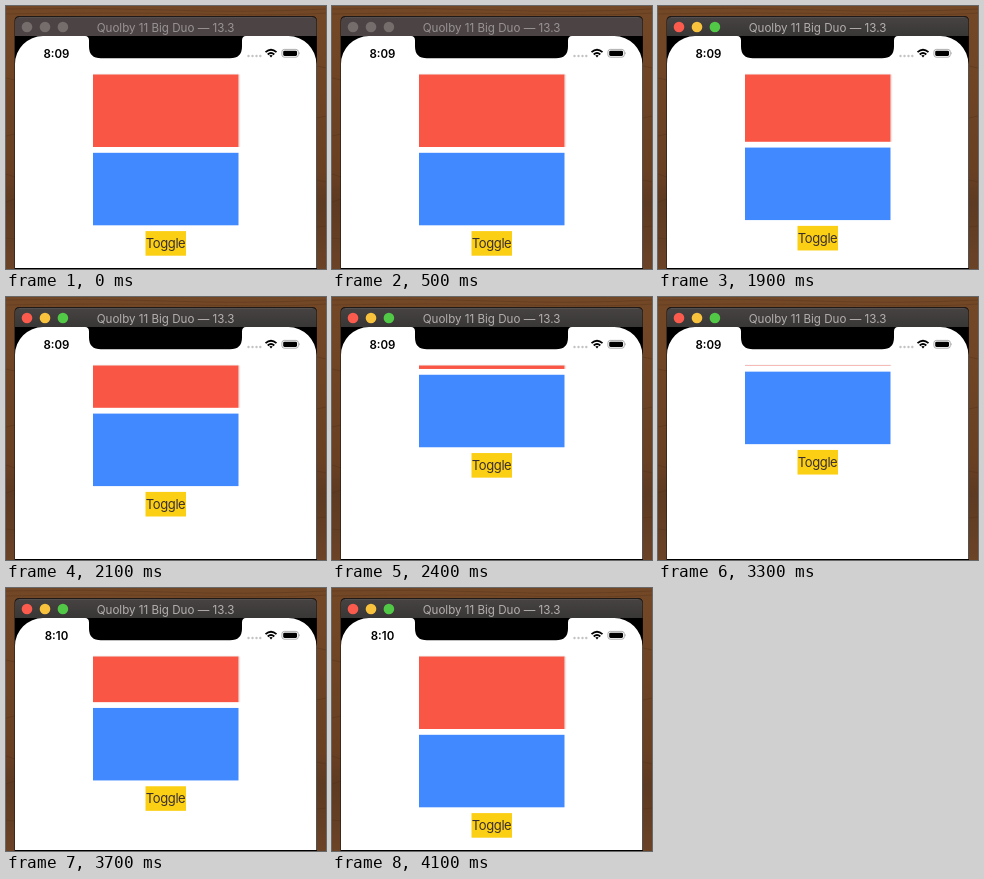
An HTML page that plays this animation: 320x263 px, repeating every 4.4 s.

```html
<!DOCTYPE html>
<html lang="en">
<head>
<meta charset="utf-8">
<title>Toggle animation</title>
<style>
  html, body { margin: 0; width: 100%; height: 100%; overflow: hidden; background: #6c4325; }
  svg { display: block; width: 100vw; height: 100vh; }
  text { font-family: Inter, "Liberation Sans", sans-serif; text-anchor: middle; }
  .bar { fill: #4b4344; }
  .title { font-size: 11.6px; fill: #999394; }
  .lights circle { fill: #756c6c; }
  .active .bar { fill: url(#barActive); }
  .active .title { fill: #b3afae; }
  .active .close { fill: #fb5b4d; }
  .active .minimize { fill: #f8c23c; }
  .active .zoom { fill: #52c946; }
  .clock { font-size: 11.5px; font-weight: 600; }
  .label { font-size: 13px; letter-spacing: -.4px; fill: #3a2f30; }
</style>
</head>
<body>
<svg id="stage" viewBox="0 0 320 263" preserveAspectRatio="none">
  <defs>
    <linearGradient id="wood" x2="0" y2="1">
      <stop offset="0" stop-color="#734827"/>
      <stop offset=".3" stop-color="#6e4425"/>
      <stop offset=".62" stop-color="#6a4023"/>
      <stop offset=".75" stop-color="#5d3a22"/>
      <stop offset="1" stop-color="#6b4327"/>
    </linearGradient>
    <linearGradient id="barActive" x2="0" y2="1">
      <stop offset="0" stop-color="#474343"/>
      <stop offset="1" stop-color="#393636"/>
    </linearGradient>
  </defs>

  <rect width="320" height="263" fill="url(#wood)"/>
  <g fill="none" stroke="#4f3019" stroke-opacity=".35">
    <path d="M0 3Q80 1 160 4T320 3M0 8Q100 6 190 8T320 7"/>
    <path d="M0 72l9 2M0 130l9-2M0 168l9 3M0 196l9-3M0 232l9 1M311 60l9 2M311 112l9-2M311 174l9 2M311 221l9-1"/>
  </g>

  <path d="M8.500 263V15Q8.500 10 13.500 10H306Q311 10 311 15V263Z" fill="#17110f"/>
  <path class="bar" d="M9 30V15.500Q9 11 13.500 11H306Q310.500 11 310.500 15.500V30Z"/>
  <path d="M13 11.300H306.500" stroke="#625d5d" stroke-width=".6"/>
  <g class="lights">
    <circle class="close" cx="21" cy="21" r="5.300"/>
    <circle class="minimize" cx="39" cy="21" r="5.300"/>
    <circle class="zoom" cx="56.900" cy="21" r="5.300"/>
  </g>
  <text class="title" x="159.500" y="25.500">Quolby 11 Big Duo — 13.3</text>

  <rect x="9" y="30" width="301.500" height="233" fill="#000"/>
  <path fill="#fff" d="M9 262V58A28 28 0 0 1 37 30H79Q83 30 83 34.500V40.500Q83 52.300 95 52.300H224Q236 52.300 236 40.500V34.500Q236 30 240 30H282.300A28 28 0 0 1 310.300 58V262Z"/>

  <text class="clock" id="clock" x="50.500" y="51.500">8:09</text>
  <g fill="#c3c3c5">
    <circle cx="242.500" cy="50" r="1.200"/><circle cx="246.500" cy="50" r="1.200"/>
    <circle cx="250.500" cy="50" r="1.200"/><circle cx="254.300" cy="50" r="1.200"/>
  </g>
  <g fill="none" stroke="#000" stroke-width="1.800">
    <path d="M259.500 46.200Q265 41.200 270.500 46.200M261.700 48.500Q265 45.600 268.300 48.500"/>
    <path d="M263.300 49.600Q265 48.400 266.700 49.600L265 51.400Z" fill="#000" stroke="none"/>
  </g>
  <rect x="275.900" y="43.400" width="16.400" height="7.800" rx="2.400" fill="none" stroke="#999" stroke-width=".8"/>
  <rect x="277.200" y="44.700" width="13.800" height="5.200" rx="1.300"/>
  <path d="M293.300 45.800Q294.700 47.300 293.300 48.800Z" fill="#999"/>

  <path d="M87 68.200H233" stroke="#ebe6e7" stroke-width=".8"/>
  <rect id="edge" x="232.500" y="68.500" width="1.700" fill="#ece5e4"/>
  <rect id="red" x="87" y="68.500" width="145.500" fill="#fa5645"/>
  <g id="below">
    <rect x="87" y="74.300" width="145.500" height="72.500" fill="#4189ff"/>
    <rect x="139.500" y="152.600" width="40.500" height="24.600" fill="#fbcf14"/>
    <text class="label" x="159.600" y="169.500">Toggle</text>
  </g>
</svg>
<script>
  const LOOP = 4400, STEP = 100, DURATION = 760, FULL_HEIGHT = 72.5;
  const COLLAPSE_AT = 1757, EXPAND_AT = 3262;
  const [stage, clock, edge, red, below] =
    ['stage', 'clock', 'edge', 'red', 'below'].map(id => document.getElementById(id));

  const bezier = (u, a, b) => 3 * u * (1 - u) ** 2 * a + 3 * u * u * (1 - u) * b + u ** 3;

  // cubic-bezier(.42, 0, .58, 1)
  function easeInOut(x) {
    if (x <= 0) return 0;
    if (x >= 1) return 1;
    let low = 0, high = 1;
    for (let i = 0; i < 20; i++) {
      const mid = (low + high) / 2;
      if (bezier(mid, .42, .58) < x) low = mid; else high = mid;
    }
    return bezier(low, 0, 1);
  }

  const progress = (t, start) => easeInOut((t - start) / DURATION);

  function draw(t) {
    const height = FULL_HEIGHT * (1 - progress(t, COLLAPSE_AT) + progress(t, EXPAND_AT));
    red.setAttribute('height', height);
    edge.setAttribute('height', height);
    below.setAttribute('transform', `translate(0 ${height})`);
    stage.classList.toggle('active', t >= 1800);
    clock.textContent = t >= 3600 ? '8:10' : '8:09';
  }

  const start = performance.now();
  function tick() {
    const t = (performance.now() - start) % LOOP;
    draw(Math.floor(t / STEP) * STEP);
    requestAnimationFrame(tick);
  }
  tick();
</script>
</body>
</html>
```
